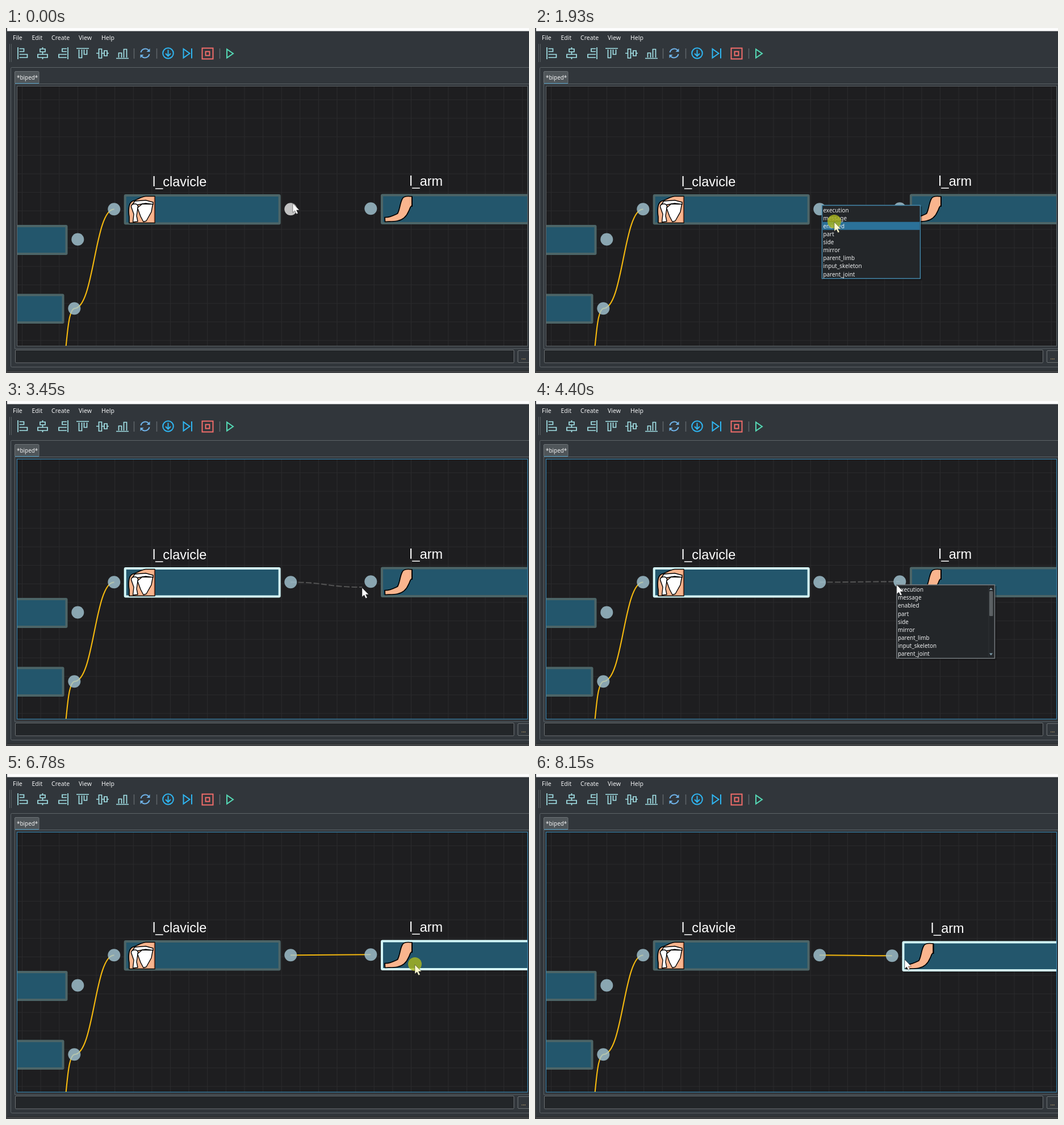
An HTML page for the animation above (8220 ms loop, 921 px wide and 608 px high).

```html
<!DOCTYPE html>
<html lang="en">
<head>
<meta charset="utf-8">
<title>Node graph</title>
<style>
  html, body { margin: 0; width: 100%; height: 100%; overflow: hidden; background: #31363b; }
  svg { display: block; }
  text { font: 9.9px "Noto Sans", "Open Sans", sans-serif; fill: #eff0f1; white-space: pre; }
  .menu text { font-size: 10.5px; }
  .name { font: 23.5px "Liberation Sans", Arial, sans-serif; fill: #fff; }
  .icon { fill: none; stroke: #a3e2e8; stroke-width: 1.7; }
  .sep { stroke: #5f666a; stroke-width: 1.5; }
  .box { fill: #23566c; stroke: #4d6567; stroke-width: 4; stroke-linejoin: round; }
  .box.on { stroke: #d3f7f8; }
  .port { fill: rgba(165, 200, 214, .8); }
  .port.hot { fill: #c2c2c2; }
  .wire { fill: none; stroke: #f5b90f; stroke-width: 2.1; }
  .wire.draft { stroke: #525252; stroke-dasharray: 10 3.5; }
  .skin { fill: #fab58e; stroke: #000; stroke-width: 1.7; stroke-linejoin: round; }
  .bone { fill: #fff; stroke: #000; stroke-width: 1.4; stroke-linejoin: round; }
  .frame { fill: none; stroke: #5d6468; }
  .frame.on { stroke: #3587b3; }
</style>
</head>
<body>
<svg width="921" height="608" viewBox="0 0 921 608">
  <defs>
    <clipPath id="clip"><rect x="19.5" y="102.5" width="899" height="458"/></clipPath>
    <pattern id="grid" x="28" y="126" width="32.62" height="32.62" patternUnits="userSpaceOnUse">
      <path d="M.5 0V33M0 .5H33" stroke="#2a2a2c"/>
    </pattern>
  </defs>

  <rect width="921" height="608" fill="#31363b"/>
  <rect width="1.5" height="608" fill="#47494b"/>
  <rect x="2" width="919" height="5.5" fill="#fcfcfc"/>
  <rect y="604" width="921" height="4" fill="#3f4143"/>
  <path d="M2 603.5H921" stroke="#25282a"/>

  <g class="menu">
    <text x="12" y="21">File</text>
    <text x="45.5" y="21">Edit</text>
    <text x="80" y="21">Create</text>
    <text x="128" y="21">View</text>
    <text x="168" y="21">Help</text>
  </g>

  <path d="M6.5 28V60M9.5 28V60" stroke="#575d61"/>
  <g class="icon">
    <path d="M21 34V55M23.500 36.500h8v5h-8M23.500 46.500h14v5.500h-14"/>
    <path d="M64.500 34V37M64.500 42V46.500M64.500 52V55M60 37h9v5h-9zM56 46.500h17v5.500h-17z"/>
    <path d="M109 34V55M107 36.500h-8v5h8M107 46.500h-14v5.500h14"/>
    <path d="M124 36H146M128.500 38v14.500h5v-14.500M137.500 38v8.500h5v-8.500"/>
    <path d="M159 44.500H163.500M168.500 44.500H173M178 44.500H181M163.500 37h5v16h-5zM173 40h5v9h-5z"/>
    <path d="M194 53.500H216M198.500 52v-8h5v8M207.500 52v-14.500h5v14.500"/>
  </g>
  <path class="sep" d="M225.500 36V54M265.500 36V54M376.500 36V54"/>
  <g class="icon" style="stroke-width:2">
    <path d="M237.500 43A8 8 0 0 1 251 39M252.500 46A8 8 0 0 1 239 50" stroke="#6fb1e6"/>
    <path d="M253.500 36V42H247.500ZM236.500 53V47H242.500Z" fill="#6fb1e6" stroke="none"/>
    <g stroke="#2fb6f2">
      <circle cx="285.500" cy="44.500" r="9.300"/>
      <path d="M285.500 38.500V49M281 45L285.500 49.500L290 45"/>
      <path d="M312.500 37V52.500L323.500 44.700ZM327 36V53.500"/>
    </g>
    <path d="M345.500 35.500H364.500V54.500H345.500ZM351.500 41.500H358.500V48.500H351.500Z" stroke="#f26d6b"/>
    <path d="M389 37.500V52.500L400 45Z" stroke="#55d8b4"/>
  </g>

  <rect class="frame" x="8.500" y="69.500" width="930" height="528" rx="2"/>
  <rect class="frame" x="15.500" y="98.500" width="930" height="466.500"/>
  <rect x="15.500" y="76.500" width="42.500" height="21.500" rx="1.500" fill="#50565a" stroke="#6d7377"/>
  <path d="M16 97.500H58" stroke="#4a93b8"/>
  <text x="19" y="90.500">*biped*</text>
  <rect x="16.500" y="567.500" width="878" height="22.500" rx="1.500" fill="#232629" stroke="#6c7174"/>
  <rect x="901.500" y="568.500" width="30" height="21" rx="1.500" fill="#31363b" stroke="#6c7174"/>
  <text x="907.500" y="583.500" style="fill:#e8c07a">...</text>

  <g clip-path="url(#clip)">
    <rect x="19" y="102" width="900" height="459" fill="#1e1e20"/>
    <rect x="19" y="102" width="900" height="459" fill="url(#grid)"/>
    <path class="wire" d="M190.500 319.300C155.500 319.300 155.500 494.300 120.500 494.300C110.500 497 108.500 535 105.500 562"/>
    <path class="wire" id="wire"/>

    <rect class="box" x="-40" y="349" width="146.500" height="49" rx="1"/>
    <circle class="port" cx="126.300" cy="372.500" r="11"/>
    <rect class="box" x="-40" y="470.500" width="140.500" height="48.500" rx="1"/>
    <circle class="port" cx="120.300" cy="494.300" r="11"/>

    <rect class="box" id="clavicle" x="209.700" y="295" width="272" height="49.500" rx="1"/>
    <path class="skin" d="M217 343.500V333C215 321 216 309 222 305.500C232 303 236 297.500 246 296.500H262V343.500Z"/>
    <path d="M261.500 297V343" stroke="#8a4b32" stroke-width="1.500"/>
    <path class="bone" d="M222 312L227 305L246 303.500L259 307V311L246 309L229 312Z"/>
    <path class="bone" d="M220.500 315C220.500 309 231 308 232.500 314L230 331L232 341L223.500 342L225 328Z"/>
    <path class="bone" d="M231.500 317L240 310L258.500 310.500L256 324L247 340L242 341.500L237 332Z"/>
    <text class="name" x="258" y="279">l_clavicle</text>
    <circle class="port" cx="190.300" cy="319.300" r="11"/>
    <circle class="port" id="out" cx="501.300" cy="319.300" r="11"/>

    <g id="arm">
      <rect class="box" id="armBox" x="662" y="294.500" width="320" height="49.500" rx="1"/>
      <path class="skin" d="M698 301C700 296.500 708 296 715 297L715 313C711 315 711.500 319 709 323C705 333 697 338.500 689 340C680 342 672 340.500 667.500 341.500L667 333.500C675 334.500 683 330 689.500 327C694 319 693.500 309 698 301Z"/>
      <path d="M715 297V315" stroke="#000" stroke-width="2"/>
      <text class="name" x="710.400" y="278">l_arm</text>
      <circle class="port" id="in" cx="642.300" cy="318.300" r="11"/>
    </g>
  </g>
  <rect class="frame" id="view" x="19.500" y="102.500" width="899" height="458"/>

  <g id="popups"></g>
  <circle id="click" r="12" fill="#aab61e" fill-opacity=".82"/>
  <path id="cursor" d="M0 0V16.300L3.700 12.900L6.500 18.800L9.200 17.600L6.500 11.900H11.600Z" stroke="#1c1c1c" stroke-width=".5"/>
</svg>

<script>
const LOOP = 8220, STEP = 70, ROW = 14.1;
const $ = id => document.getElementById(id);
const items = ['execution', 'message', 'enabled', 'part', 'side', 'mirror',
  'parent_limb', 'input_skeleton', 'parent_joint'];

// Cursor moves: start time, number of steps, end point
const moves = [
  [870, 10, 527, 342],
  [2400, 12, 617, 331],
  [3240, 4, 627, 329],
  [3520, 6, 637, 324],
  [4470, 7, 655, 361],
  [5950, 11, 720, 336],
  [7180, 5, 706.5, 338],
  [7530, 6, 645, 331],
  [8010, 3, 651, 327]
];
const clicks = [[200, 340], [1930, 2000], [5350, 5420], [6780, 7530]];
const popups = [
  makePopup(505.5, 312.5, 173, 129, '#4589ad', false),
  makePopup(637, 324, 172.5, 129.5, '#777c80', true)
];
const within = (t, a, b) => t >= a && t < b;

function makePopup(x, y, w, h, edge, scroll) {
  const rowW = scroll ? 161 : w - 2, top = y + 1;
  const g = document.createElementNS('http://www.w3.org/2000/svg', 'g');
  const bar = !scroll ? '' : `
    <path d="M${x + 162} ${y + 1}V${y + h - 1}" stroke="#2e3336"/>
    <path d="M${x + 163} ${y + 9}h6l-3 -4zM${x + 163} ${y + h - 9}h6l-3 4z" fill="#7d9aa8"/>
    <rect x="${x + 163}" y="${y + 11}" width="6.500" height="44" rx="1.500" fill="#5b6063"/>`;
  g.innerHTML = `
    <rect x="${x + 2}" y="${y + 2}" width="${w + 1}" height="${h + 1}" fill-opacity=".35"/>
    <rect x="${x}" y="${y}" width="${w}" height="${h}" fill="#232629" stroke="${edge}" stroke-width="1.500"/>
    <rect class="row" x="${x + 1}" width="${rowW}" height="${ROW}" fill="#2b7199"/>${bar}` +
    items.map((s, i) => `<text x="${x + 2}" y="${top + i * ROW + 11.2}">${s}</text>`).join('');
  $('popups').append(g);
  return { g, top, row: g.querySelector('.row') };
}

function showPopup(p, open, y) {
  p.g.style.display = open ? '' : 'none';
  const i = Math.floor((y - p.top) / ROW);
  p.row.style.display = i >= 0 && i < items.length ? '' : 'none';
  p.row.setAttribute('y', p.top + i * ROW);
}

function cursorAt(t) {
  let x = 505, y = 309;
  for (const [start, n, ex, ey] of moves) {
    if (t < start) break;
    const k = Math.min(1, (Math.floor((t - start) / STEP) + 1) / n);
    const e = k * k * (3 - 2 * k);
    x += (ex - x) * e;
    y += (ey - y) * e;
  }
  return [x, y];
}

function render(t) {
  const [x, y] = cursorAt(t);
  const open = [within(t, 270, 2000), within(t, 3940, 5420)];
  popups.forEach((p, i) => showPopup(p, open[i], y));

  // Dragged node follows the cursor until release
  const dx = t >= 7180 ? Math.max(-13.5, x - 720) : 0, dy = -dx * 2 / 13.5;
  const inX = 642.3 + dx, inY = 318.3 + dy;
  $('arm').setAttribute('transform', `translate(${dx} ${dy})`);

  const free = !open[0] && !open[1];
  const near = (px, py) => free && Math.hypot(x - px, y - py) < 11.5;
  const overIn = near(inX, inY);
  $('out').classList.toggle('hot', near(501.3, 319.3));
  $('in').classList.toggle('hot', overIn);

  const draft = within(t, 2000, 5420);
  const snap = !draft || overIn || open[1];
  const [ex, ey] = snap ? [inX, inY] : [x, y - 1];
  const mid = (501 + ex) / 2;
  $('wire').style.display = t < 2000 ? 'none' : '';
  $('wire').classList.toggle('draft', draft);
  $('wire').setAttribute('d', `M501 319.300C${mid} 319.300 ${mid} ${ey} ${ex} ${ey}`);

  $('clavicle').classList.toggle('on', draft);
  $('armBox').classList.toggle('on', t >= 6780);
  $('view').classList.toggle('on', t >= 2000);

  const down = clicks.some(([a, b]) => within(t, a, b));
  $('click').style.display = down ? '' : 'none';
  $('click').setAttribute('transform', `translate(${x} ${y - 1})`);
  $('cursor').setAttribute('transform', `translate(${x} ${y})`);
  $('cursor').setAttribute('fill', down ? '#fdfbd0' : '#fff');
}

const began = performance.now();
function tick() {
  render((performance.now() - began) % LOOP);
  requestAnimationFrame(tick);
}
tick();
</script>
</body>
</html>
```
